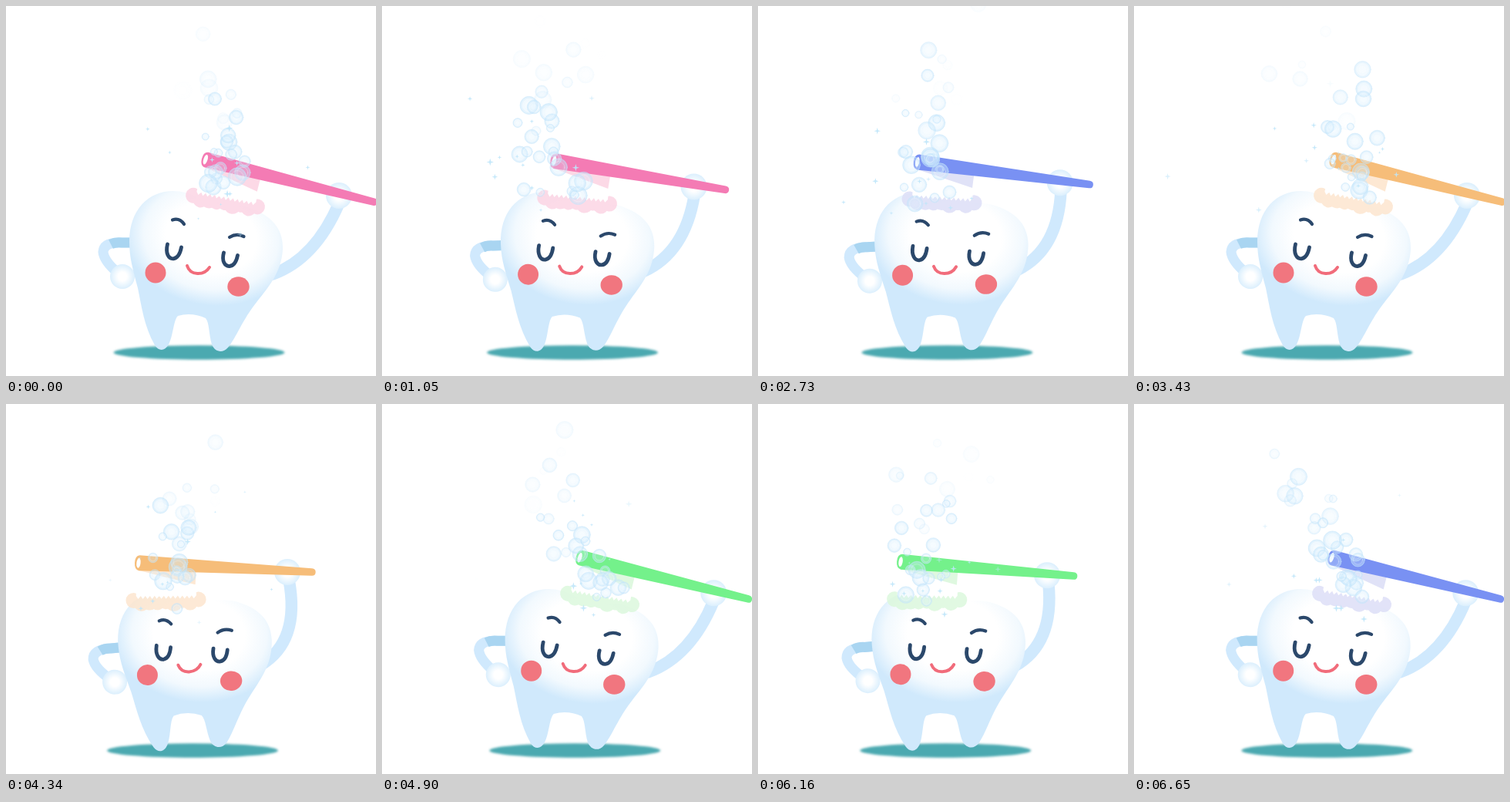
An HTML page for the animation above (6720 ms loop, 480x480 px).

```html
<!DOCTYPE html>
<html lang="en">
<head>
<meta charset="utf-8">
<title>Brushing tooth</title>
<style>
  html, body { margin: 0; width: 100%; height: 100%; overflow: hidden; background: #fff; }
  svg { display: block; width: 100vw; height: 100vh; }
</style>
</head>
<body>
<svg viewBox="0 0 480 480" fill="none" stroke-linecap="round" stroke-linejoin="round">
  <defs>
    <radialGradient id="enamel" gradientUnits="userSpaceOnUse" cx="0" cy="0" r="1"
      gradientTransform="translate(266 300) rotate(9) scale(114 88)">
      <stop offset=".52" stop-color="#fff"/>
      <stop offset=".77" stop-color="#f2f9fe"/>
      <stop offset="1" stop-color="#d0e9fc"/>
    </radialGradient>
    <radialGradient id="palm">
      <stop offset=".35" stop-color="#fff"/>
      <stop offset="1" stop-color="#dbeffd"/>
    </radialGradient>
    <radialGradient id="bubble">
      <stop offset=".35" stop-color="#d6eefd" stop-opacity=".3"/>
      <stop offset=".7" stop-color="#cdeafd" stop-opacity=".45"/>
      <stop offset="1" stop-color="#bfe3fb" stop-opacity=".7"/>
    </radialGradient>
    <filter id="soft" x="-10%" y="-60%" width="120%" height="220%"><feGaussianBlur stdDeviation="1.4"/></filter>
  </defs>

  <ellipse id="shadow" cx="250.5" cy="449.5" rx="111" ry="9.3" fill="#4ba9b0" filter="url(#soft)"/>

  <path id="arm" stroke="#d0e9fd" stroke-width="15.5"/>

  <g id="body">
    <g stroke-width="13">
      <path d="M164 307H150Q127 306 126 319Q127 331 146 347" stroke="#d0e9fd"/>
      <path d="M164 307H150Q142 306 136 309" stroke="#a9d5f1" stroke-linecap="butt"/>
    </g>
    <circle cx="151" cy="351" r="16" fill="url(#palm)"/>
    <path fill="url(#enamel)" d="M160 306C160 264 185 240 217 240C240 240 250 252 270 257
      C290 260 304 256 322 264C348 275 360 292 359 316C357 346 341 364 326 383
      C306 408 299 430 288 443C281 451 271 449 267 439C263 426 264 411 259 405
      Q241 397 223 402C217 408 217 428 211 439C206 448 198 448 193 440
      C179 415 176 390 171 366C165 343 160 327 160 306Z"/>
    <g stroke="#2b486b" stroke-width="4.8">
      <path d="M209.5 309C206.5 321 211 328 217 327.8C223 327 226 321 227.5 313"/>
      <path d="M282.5 320C279.5 331 284 338 290 337.5C296 337 299 331 300.5 323.5"/>
      <path d="M216 277.5Q225 274.5 231 283M290 300Q299 294.5 308.5 299" stroke-width="4.2"/>
    </g>
    <path d="M235 337C239 350 257 350 264 339" stroke="#f16c7b" stroke-width="4"/>
    <g fill="#f1767f">
      <circle cx="194" cy="346" r="13.5"/>
      <ellipse cx="301.5" cy="364" rx="14.2" ry="12.8"/>
    </g>
  </g>

  <circle id="hand" r="17" fill="url(#palm)"/>

  <g id="brush">
    <g id="foam" opacity=".85"></g>
    <path id="bristles" fill="#fff"/>
    <path id="tint" d="M3 9L80 8L80 24Z" opacity=".9"/>
    <path id="handle" d="M6 -10L230 -4.8Q235 -4.5 235 0Q235 4.8 230 4.8L6 10Q0 9 0 0Q0 -9 6 -10Z"/>
    <ellipse cx="5" cy="0" rx="2.6" ry="6.5" fill="#fff" transform="rotate(4 5 0)"/>
  </g>

  <g id="bubbles" stroke="#c9e7fb" stroke-opacity=".6" stroke-width="1"></g>
  <g id="stars" fill="#bfe5fa"></g>
</svg>

<script>
const FRAME = 70, FRAMES = 96, STROKE = 25;
const BUBBLE_RATE = 2.6, STAR_RATE = 0.9;
const PINK = ['#f47bb4', '#fcd5e4'], BLUE = ['#7991f3', '#dddff7'];
const ORANGE = ['#f6bd79', '#fde6cf'], GREEN = ['#74f18b', '#dcf8dd'];
const PAINTS = [PINK, BLUE, ORANGE, GREEN, BLUE];
const PAINT_SHIFT = 5;

const $ = id => document.getElementById(id);
const set = (id, name, value) => $(id).setAttribute(name, value);
const mix = (a, b, k) => a + (b - a) * k;
const easeOut = u => 1 - (1 - u) ** 4;
const random = (i, k) => {
  const v = Math.sin(i * 12.9898 + k * 78.233) * 43758.5453;
  return v - Math.floor(v);
};
const spread = (i, k, range) => (random(i, k) * 2 - 1) * range;

// 0 = brush at the right end, 1 = at the left end
function stroke(frame) {
  const p = ((frame % STROKE) + STROKE) % STROKE, half = STROKE / 2;
  return p < half ? easeOut(p / half) : 1 - easeOut((p - half) / half);
}

function brushPose(q) {
  return { x: 254 - 87 * q, y: 198 + 8 * q ** 1.5, angle: 14.1 - 11.1 * q };
}

function emitter(frame) {
  const { x, y, angle } = brushPose(stroke(frame));
  const a = angle * Math.PI / 180;
  return { x: x + 45 * Math.cos(a) - 36 * Math.sin(a), y: y + 45 * Math.sin(a) + 36 * Math.cos(a) };
}

function buildBrush() {
  let foam = '';
  for (let i = 0; i <= 8; i++) {
    const k = i / 8, edge = i % 8 === 0;
    foam += `<circle cx="${mix(1, 85, k)}" cy="${mix(49, 43, k) + (edge ? 0 : 2 + i % 2 * 2)}" r="${edge ? 10 : 9 + i % 3}"/>`;
  }
  $('foam').innerHTML = foam;

  let d = 'M3 9L80 8L82 38';
  for (let i = 1; i <= 26; i++) d += `L${mix(82, 4, i / 26)} ${mix(38, 43, i / 26) + (i % 2 ? 4 : 0)}`;
  set('bristles', 'd', d + 'Z');
}

// Calls draw(index, age, origin) for every particle alive at this frame
function particles(frame, rate, life, draw) {
  let out = '';
  for (let i = Math.ceil((frame - life) * rate); i <= frame * rate; i++) {
    const born = i / rate;
    out += draw(i, frame - born, emitter(born));
  }
  return out;
}

function bubble(i, age, from) {
  const life = 9 + random(i, 1) * 5;
  if (age > life) return '';
  const rise = mix(13, 23, random(i, 5)) * age * age / (age + 2);
  const x = from.x + spread(i, 2, 28) + spread(i, 3, 3) * age;
  const y = from.y + spread(i, 4, 24) - rise;
  const r = mix(4.5, 12, random(i, 6));
  const alpha = 0.85 * Math.min(1, (life - age) / 5);
  return `<g opacity="${alpha}"><circle cx="${x}" cy="${y}" r="${r}" fill="url(#bubble)"/>` +
    `<circle cx="${x}" cy="${y}" r="${r * 0.68}" stroke="#fff" opacity=".55"/></g>`;
}

function star(i, age, from) {
  const life = 8 + random(i, 11) * 8;
  if (age > life) return '';
  const x = from.x + spread(i, 12, 40) + spread(i, 13, 11) * age;
  const y = from.y + spread(i, 14, 35) + mix(-15, 4, random(i, 15)) * age;
  const r = mix(1.5, 5, random(i, 16)), s = r * 0.22;
  const alpha = Math.min(0.9, (life - age) / 4);
  return `<path opacity="${alpha}" transform="translate(${x} ${y})" ` +
    `d="M0 ${-r}L${s} ${-s}L${r} 0L${s} ${s}L0 ${r}L${-s} ${s}L${-r} 0L${-s} ${-s}Z"/>`;
}

function render(frame) {
  const q = stroke(frame), pose = brushPose(q);
  const [solid, pale] = PAINTS[Math.floor((frame + PAINT_SHIFT) / STROKE)];
  const hand = { x: 432 - 67 * q, y: 246 - 28 * q };

  set('shadow', 'transform', `translate(${-8.5 * q} 0)`);
  set('body', 'transform', `rotate(${-5.5 * q} 247 459)`);
  set('arm', 'd', `M${mix(346, 330, q)} ${mix(348, 339, q)}` +
    `Q${mix(401, 382, q)} ${mix(328, 308, q)} ${hand.x + q * 2} ${hand.y + 10}`);
  set('hand', 'cx', hand.x);
  set('hand', 'cy', hand.y);
  set('brush', 'transform', `translate(${pose.x} ${pose.y}) rotate(${pose.angle})`);
  set('handle', 'fill', solid);
  set('foam', 'fill', pale);
  set('tint', 'fill', pale);
  $('bubbles').innerHTML = particles(frame, BUBBLE_RATE, 14, bubble);
  $('stars').innerHTML = particles(frame, STAR_RATE, 16, star);
}

let shown = -1;
const start = performance.now();
function tick() {
  const frame = Math.floor((performance.now() - start) / FRAME) % FRAMES;
  if (frame !== shown) render(shown = frame);
  requestAnimationFrame(tick);
}

buildBrush();
tick();
</script>
</body>
</html>
```
